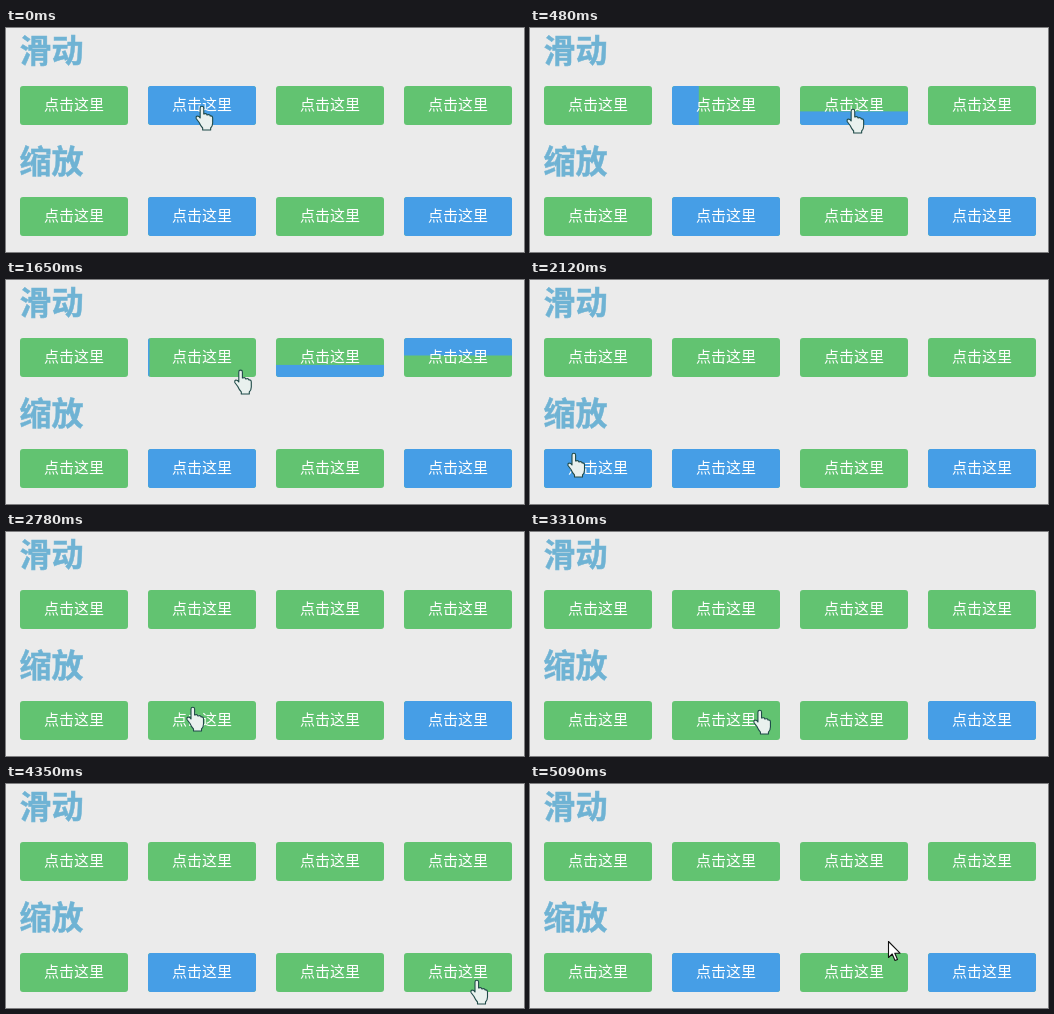
These frames come from a looping animation (518 px wide and 224 px high, 5160 ms). An HTML page:

```html
<!DOCTYPE html>
<html lang="zh">
<head>
<meta charset="utf-8">
<style>
  html, body { margin: 0; width: 100%; height: 100%; overflow: hidden; background: #ebebeb; }
  svg { display: block; width: 518px; height: 224px; }
  text { font-family: "Noto Sans CJK SC", "Noto Sans CJK", sans-serif; }
  .title { font-size: 32px; font-weight: bold; fill: #6fb3d4; stroke: #6fb3d4; stroke-width: .5; }
  .label { font-size: 15px; font-weight: 300; fill: #fff; text-anchor: middle; }
  .base { fill: #62c371; }
  .fill { fill: #469ee6; }
</style>
</head>
<body>
<svg viewBox="0 0 518 224">
  <clipPath id="round"><rect width="108" height="39" rx="3"/></clipPath>
  <text class="title" x="13.5" y="34">滑动</text>
  <text class="title" x="13.5" y="145">缩放</text>
  <g id="buttons"></g>
  <g id="cursor" stroke-linejoin="round">
    <path id="hand" fill="#e9f1ee" stroke="#1f4a48" stroke-width="1.1"
      d="M-2 1a1.800 1.800 0 0 1 3.600 0v6q3-1 3.200 1q3-1 3.200 1q2.500-.5 2.500 2v5q0 3-2 5v2h-8v-2q-2-2-3.500-5.500l-3-4q-.5-2 1-2.500q2 0 3 2z"/>
    <path id="arrow" fill="#fff" stroke="#111" stroke-width="1.1"
      d="M.5 .5V16.500L4.200 13 7 19.500 9.500 18.500 6.800 12.200H12Z"/>
  </g>
</svg>
<script>
const LOOP = 5160, FADE = 300, W = 108, H = 39;
const $ = id => document.getElementById(id);

// Pointer stops: time, x, y
const stops = [
  [0, 196, 79], [345, 250, 80], [414, 270, 81], [480, 323, 82],
  [845, 378, 84], [930, 398, 84], [1110, 465, 83], [1515, 465, 83],
  [1720, 118, 95], [1785, 44, 174], [2385, 44, 174], [2540, 187, 176],
  [3240, 187, 176], [3660, 441, 194], [4350, 471, 197], [4500, 471, 197],
  [4700, 390, 168], [5090, 358, 157], [LOOP, 358, 157]
];

function pointer(t) {
  const i = stops.findIndex(stop => stop[0] > t);
  const [t0, x0, y0] = stops[i - 1], [t1, x1, y1] = stops[i];
  const k = (t - t0) / (t1 - t0);
  return { x: x0 + (x1 - x0) * k, y: y0 + (y1 - y0) * k };
}

// cubic-bezier(.25, .1, .25, 1), solved by bisection
function ease(x) {
  if (x >= 1) return 1;
  let lo = 0, hi = 1, s;
  for (let i = 0; i < 20; i++) {
    s = (lo + hi) / 2;
    if (0.75 * s * (1 - s) + s ** 3 < x) lo = s; else hi = s;
  }
  return 0.3 * s * (1 - s) ** 2 + 3 * s * s * (1 - s) + s ** 3;
}

// Top row slides in from one side; bottom row zooms from the centre
const slide = (axis, ox, oy) => ({ axis, ox, oy });
const zoom = (circle, inverted) => ({ axis: "xy", ox: W / 2, oy: H / 2, circle, inverted });
const effects = [
  slide("x", W, 0), slide("x", 0, 0), slide("y", 0, H), slide("y", 0, 0),
  zoom(false, false), zoom(false, true), zoom(true, false), zoom(true, true)
];

const buttons = effects.map((effect, i) => {
  const x = 14 + 128 * (i % 4), y = i < 4 ? 58 : 169;
  const shape = effect.circle
    ? `<circle class="fill" cx="${W / 2}" cy="${H / 2}" r="58"/>`
    : `<rect class="fill" width="${W}" height="${H}"/>`;
  $("buttons").insertAdjacentHTML("beforeend",
    `<g transform="translate(${x} ${y})"><g clip-path="url(#round)">
      <rect class="base" width="${W}" height="${H}"/>${shape}</g>
      <text class="label" x="${W / 2}" y="24">点击这里</text></g>`);
  return { ...effect, x, y, changes: [{ t: -LOOP, from: 0, to: 0 }],
    fill: $("buttons").lastElementChild.querySelector(".fill") };
});

const isOver = (b, p) => p.x >= b.x && p.x < b.x + W && p.y >= b.y && p.y < b.y + H;

function hoverAmount(b, t) {
  const { t: since, from, to } = b.changes.findLast(c => c.t <= t);
  return from + (to - from) * ease((t - since) / FADE);
}

// Walk the path once to record when each button is entered and left
for (const b of buttons) {
  for (let t = 0; t < LOOP; t++) {
    const to = +isOver(b, pointer(t));
    if (to !== b.changes.at(-1).to) {
      b.changes.push({ t: t || -FADE, from: hoverAmount(b, t), to });
    }
  }
}

function draw(t) {
  for (const b of buttons) {
    const amount = hoverAmount(b, t), k = b.inverted ? 1 - amount : amount;
    const sx = b.axis.includes("x") ? k : 1, sy = b.axis.includes("y") ? k : 1;
    b.fill.setAttribute("transform",
      `translate(${b.ox} ${b.oy}) scale(${sx} ${sy}) translate(${-b.ox} ${-b.oy})`);
    b.fill.setAttribute("visibility", k > 0.01 ? "visible" : "hidden");
  }
  const p = pointer(t), over = buttons.some(b => isOver(b, p));
  $("cursor").setAttribute("transform", `translate(${p.x} ${p.y})`);
  $("hand").style.display = over ? "" : "none";
  $("arrow").style.display = over ? "none" : "";
}

const start = performance.now();
function tick() {
  draw((performance.now() - start) % LOOP);
  requestAnimationFrame(tick);
}
tick();
</script>
</body>
</html>
```
